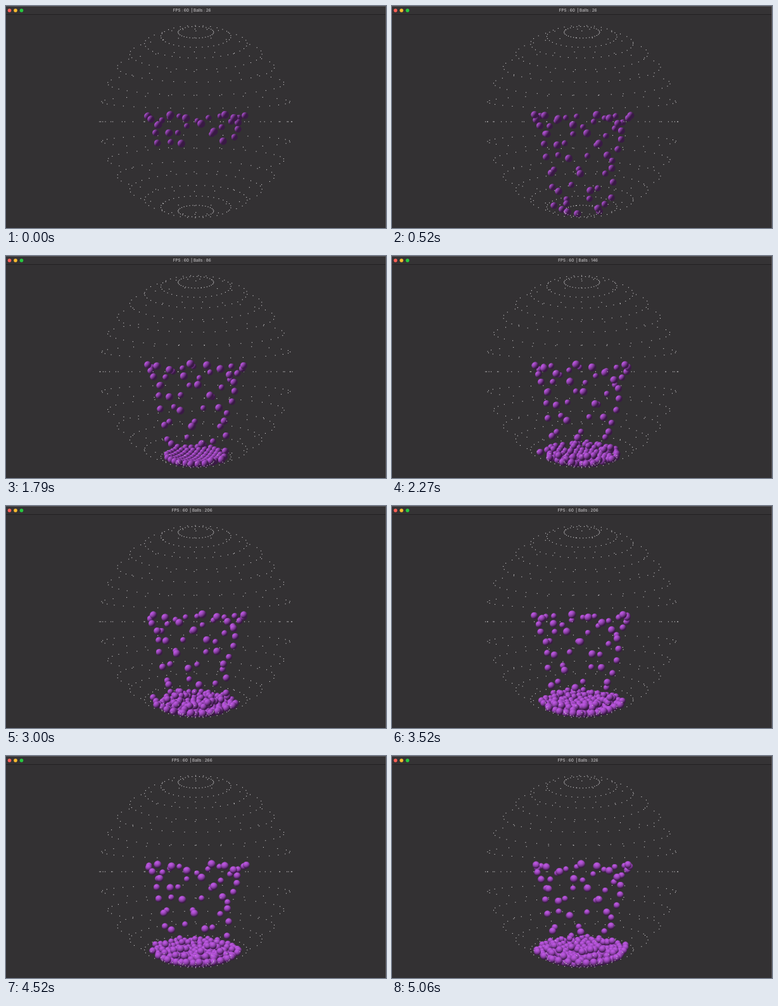
An HTML page with a canvas for the animation above (5090 ms loop, 600 px wide and 351 px high).

```html
<!DOCTYPE html>
<html lang="en">
<head>
<meta charset="utf-8">
<title>Balls in a sphere</title>
<style>
html, body { margin: 0; width: 600px; height: 351px; overflow: hidden; background: #333133; }
canvas { display: block; }
</style>
</head>
<body>
<canvas id="stage" width="600" height="351"></canvas>
<script>
const ctx = document.getElementById('stage').getContext('2d');
ctx.imageSmoothingQuality = 'high';

const LOOP = 5090, RATE = 0.06;          // ms, ticks per ms
const RADIUS = 143.5, CAMERA = 3 * RADIUS;
const BALL = 5, DRAWN = 5.35;            // contact and visible radius
const RING = 79, INWARD = 0.6, GRAVITY = 0.0889;
const FIRST = 32;                        // ticks already run when the loop starts
const LAST = FIRST + Math.floor(LOOP * RATE + 0.9);
const DEG = Math.PI / 180, SPIN = 0.25 * DEG;

// --- Simulation: one ball per tick, each one radian further round the ring ---
function emit(i) {
  const s = Math.sin(i), c = Math.cos(i);
  const x = RING * s, y = -10, z = RING * c;
  return { x, y, z, px: x + INWARD * s, py: y + GRAVITY / 2, pz: z + INWARD * c, hit: false };
}

function separate(a, b) {
  const dx = b.x - a.x, dy = b.y - a.y, dz = b.z - a.z;
  const d2 = dx * dx + dy * dy + dz * dz;
  if (d2 >= 4 * BALL * BALL || d2 === 0) return;
  const d = Math.sqrt(d2), k = (2 * BALL - d) / d / 2;
  a.x -= dx * k; a.y -= dy * k; a.z -= dz * k;
  b.x += dx * k; b.y += dy * k; b.z += dz * k;
  a.hit = b.hit = true;
}

function contain(b) {
  const d = Math.hypot(b.x, b.y, b.z), limit = RADIUS - BALL;
  if (d <= limit) return;
  const k = limit / d;
  b.x *= k; b.y *= k; b.z *= k;
  b.hit = true;
}

function step(balls) {
  for (const b of balls) {
    const vx = b.x - b.px, vy = b.y - b.py, vz = b.z - b.pz;
    b.px = b.x; b.py = b.y; b.pz = b.z;
    b.x += vx; b.y += vy + GRAVITY; b.z += vz;
    b.hit = false;
  }
  for (let pass = 0; pass < 4; pass++) {
    for (let i = 0; i < balls.length; i++)
      for (let j = 0; j < i; j++) separate(balls[i], balls[j]);
    balls.forEach(contain);
  }
  for (const b of balls) if (b.hit) {
    b.px += (b.x - b.px) * 0.04;
    b.py += (b.y - b.py) * 0.04;
    b.pz += (b.z - b.pz) * 0.04;
  }
}

const history = [], balls = [];
for (let tick = 0; tick <= LAST; tick++) {
  step(balls);
  balls.push(emit(tick));
  history.push(balls.map(b => [b.x, b.y, b.z]));
}

// --- Dotted sphere ---
const dots = [[0, -RADIUS, 0], [0, RADIUS, 0]];
for (let lat = 1; lat < 16; lat++) {
  const t = lat * Math.PI / 16;
  for (let lon = 0; lon < 32; lon++) {
    const p = lon * Math.PI / 16, r = RADIUS * Math.sin(t);
    dots.push([r * Math.sin(p), -RADIUS * Math.cos(t), r * Math.cos(p)]);
  }
}

// Turn points about the vertical axis and project them
function project(points, angle) {
  const s = Math.sin(angle), c = Math.cos(angle);
  return points.map(([x, y, z]) => {
    const depth = z * c - x * s, scale = CAMERA / (CAMERA - depth);
    return { x: 299.8 + (x * c + z * s) * scale, y: 182.9 + y * scale, depth, scale };
  });
}

// --- Ball shading ---
const SIZE = 24;
const sprite = document.createElement('canvas');
sprite.width = sprite.height = SIZE;
const spriteCtx = sprite.getContext('2d');
const image = spriteCtx.createImageData(SIZE, SIZE);

function shade(azimuth) {
  const e = 36 * DEG;
  const lx = Math.cos(e) * Math.sin(azimuth), ly = -Math.sin(e), lz = Math.cos(e) * Math.cos(azimuth);
  for (let i = 0; i < SIZE * SIZE; i++) {
    const x = (i % SIZE + 0.5) * 2 / SIZE - 1;
    const y = (Math.floor(i / SIZE) + 0.5) * 2 / SIZE - 1;
    const d = Math.hypot(x, y), z = Math.sqrt(Math.max(0, 1 - d * d));
    const light = 0.32 + 0.74 * Math.max(0, x * lx + y * ly + z * lz);
    image.data.set([178 * light, 82 * light, 213 * light, 255 * Math.min(1, Math.max(0, (1 - d) * 12))], i * 4);
  }
  spriteCtx.putImageData(image, 0, 0);
}

// --- Drawing ---
function drawWindow(count) {
  ctx.fillStyle = '#353335';
  ctx.fillRect(0, 0, 600, 13);
  ctx.fillStyle = '#222022';
  ctx.fillRect(0, 13, 600, 1);
  ctx.fillStyle = '#5a585a';
  ctx.fillRect(0, 0, 600, 1);
  ctx.fillRect(599, 0, 1, 351);
  ['#ff5f57', '#febc2e', '#28c840'].forEach((color, i) => {
    ctx.fillStyle = color;
    ctx.beginPath();
    ctx.arc(5.5 + 9.5 * i, 7, 2.8, 0, 2 * Math.PI);
    ctx.fill();
  });
  ctx.fillStyle = '#b0aeb0';
  ctx.font = '600 6.3px Inter, sans-serif';
  ctx.textAlign = 'center';
  ctx.textBaseline = 'alphabetic';
  ctx.fillText(`FPS : 60  | Balls : ${count}`, 293.7, 9.2);
}

function drawDots(list) {
  ctx.fillStyle = '#d6d4d6';
  for (const d of list) ctx.fillRect(d.x - 0.55, d.y - 0.55, 1.1, 1.1);
}

function draw(ticks) {
  const tick = FIRST + ticks, turn = SPIN * ticks;
  ctx.fillStyle = '#333133';
  ctx.fillRect(0, 0, 600, 351);

  const shell = project(dots, turn - 0.8 * DEG);
  drawDots(shell.filter(d => d.depth < 0));
  shade(turn - 87 * DEG);
  const placed = project(history[tick], turn - 133.5 * DEG).sort((a, b) => a.depth - b.depth);
  for (const b of placed) {
    const r = DRAWN * b.scale;
    ctx.drawImage(sprite, b.x - r, b.y - r, 2 * r, 2 * r);
  }
  drawDots(shell.filter(d => d.depth >= 0));

  drawWindow(26 + 60 * Math.floor((tick + 1 - 26) / 60));
}

const start = performance.now();
function frame() {
  const t = (performance.now() - start) % LOOP;
  draw(Math.floor(t * RATE + 0.9));
  requestAnimationFrame(frame);
}
frame();
</script>
</body>
</html>
```
